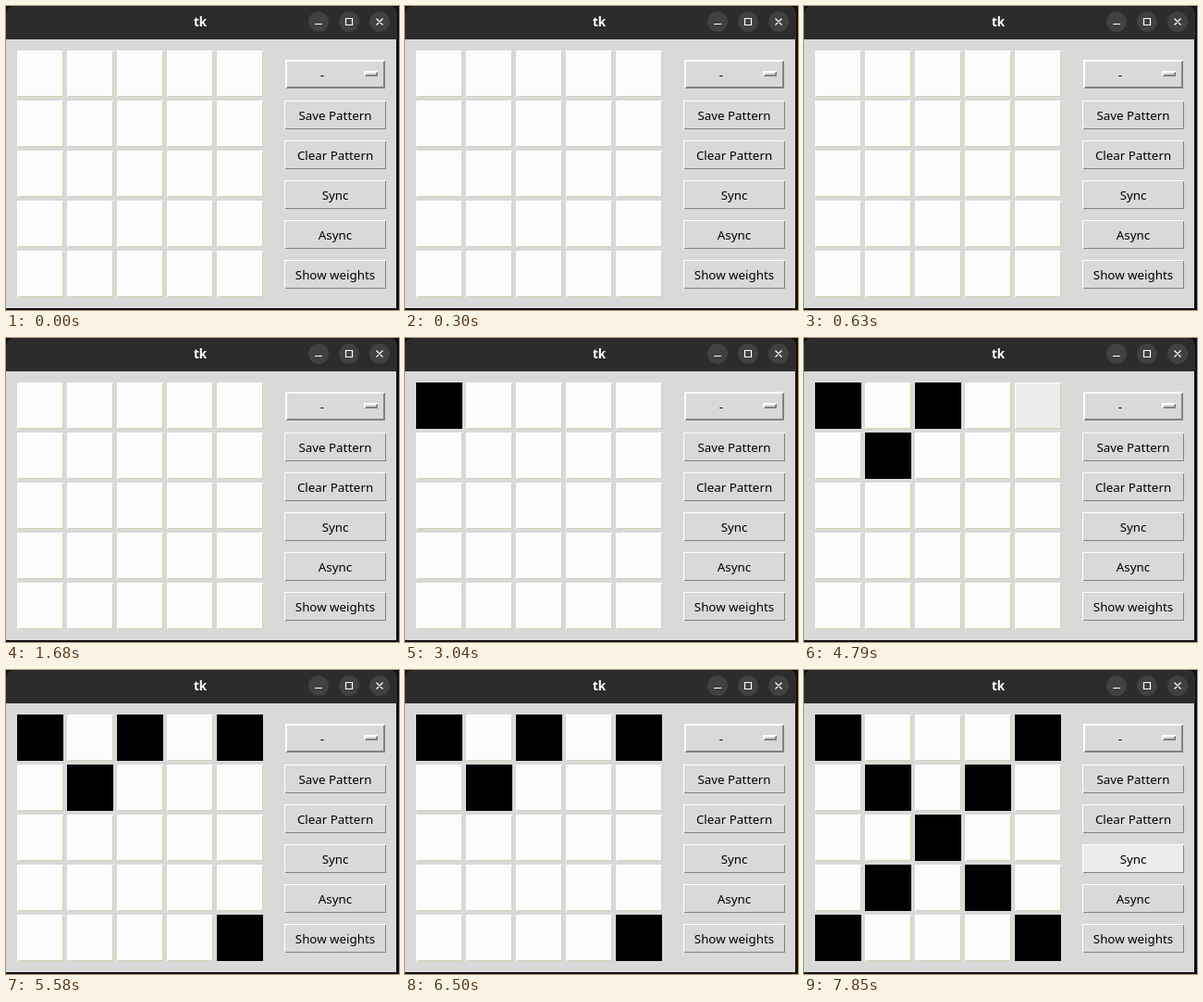
An HTML page that plays this animation: 425x328 px, repeating every 8 s.

```html
<!DOCTYPE html>
<html lang="en">
<head>
<meta charset="utf-8">
<title>tk</title>
<style>
html, body { margin: 0; width: 100%; height: 100%; overflow: hidden; background: #d9d9d9; }
svg { display: block; width: 425px; height: 328px; }
text { font: 13.33px "Noto Sans", "Open Sans", sans-serif; text-anchor: middle; fill: #000; }
.title { font-weight: 700; font-size: 13.5px; fill: #fff; }
</style>
</head>
<body>
<svg id="stage" viewBox="0 0 425 328" shape-rendering="crispEdges"></svg>
<script>
const LOOP = 8000;
const SIZE = 5;
const ACTIVE = '#ececec';
const FACE = '#d9d9d9';
const stage = document.getElementById('stage');

function add(tag, attrs, text) {
  const el = document.createElementNS('http://www.w3.org/2000/svg', tag);
  for (const key in attrs) el.setAttribute(key, attrs[key]);
  if (text) el.textContent = text;
  stage.appendChild(el);
  return el;
}

function rect(x, y, width, height, fill) {
  return add('rect', { x, y, width, height, fill });
}

// A beveled box; `set` changes its face and relief.
function bevel(x, y, w, h, b, face, light, dark) {
  const lower = rect(x, y, w, h, dark);
  const upper = add('path', {
    d: `M${x} ${y}h${w}l${-b} ${b}h${2 * b - w}v${h - 2 * b}l${-b} ${b}z`, fill: light
  });
  const inner = rect(x + b, y + b, w - 2 * b, h - 2 * b, face);
  return {
    set(fill, sunken) {
      inner.setAttribute('fill', fill);
      upper.setAttribute('fill', sunken ? dark : light);
      lower.setAttribute('fill', sunken ? light : dark);
    }
  };
}

function drawWindow() {
  rect(0, 0, 425, 328, '#101010');
  rect(0, 36, 422, 290, FACE);
  add('path', { d: 'M0 36V9Q0 0 9 0H414Q423 0 423 9V36Z', fill: '#2c2c2c', 'shape-rendering': 'auto' });
  add('text', { x: 210, y: 22, class: 'title' }, 'tk');
  for (const cx of [338, 371, 404]) {
    add('circle', { cx, cy: 17, r: 11, fill: '#414141', 'shape-rendering': 'auto' });
  }
  const icon = { fill: 'none', stroke: '#fff', 'stroke-width': 1.2, 'shape-rendering': 'auto' };
  add('path', { ...icon, d: 'M334 19.5h8M367.5 13.5h7v7h-7zM400.5 13.5l7 7m0-7l-7 7' });
}

function drawMenu() {
  bevel(302, 58, 108, 31, 2, FACE, '#fff', '#828282');
  add('text', { x: 342, y: 79 }, '-');
  bevel(387, 70, 15, 6, 2, FACE, '#fff', '#828282');
}

drawWindow();

const cells = [];
for (let i = 0; i < SIZE * SIZE; i++) {
  const x = 12 + 54 * (i % SIZE);
  const y = 48 + 54 * Math.floor(i / SIZE);
  cells.push({
    box: bevel(x, y, 50, 50, 1, '#fcfcfc', '#fff', '#d2d2b8'),
    black: rect(x, y, 50, 50, '#000')
  });
}

drawMenu();

const buttons = ['Save Pattern', 'Clear Pattern', 'Sync', 'Async', 'Show weights'].map((label, i) => {
  const y = 102 + 43 * i;
  const box = bevel(301, y, 110, 31, 1, FACE, '#fff', '#828282');
  add('text', { x: 356, y: y + 21 }, label);
  return box;
});
const sync = buttons[2];

// Pointer visits: cell index, enter time, leave time, whether it is clicked.
const visits = [
  [0, 2610, 3040, true],
  [1, 3070, 3400],
  [6, 3500, 3660, true],
  [2, 3860, 4190, true],
  [3, 4320, 4420],
  [4, 4490, 4880, true],
  [9, 4880, 4980],
  [14, 4980, 5050],
  [19, 5050, 5120],
  [24, 5120, 5580, true]
];
const HOVER = 6700, PRESS = 7690, RECALL = 7850;

// The recalled pattern is both diagonals.
function recalled(i) {
  const row = Math.floor(i / SIZE), col = i % SIZE;
  return row === col || row + col === SIZE - 1;
}

function draw(t) {
  cells.forEach((cell, i) => {
    let on = t >= RECALL && recalled(i);
    let hover = false;
    for (const [id, enter, leave, click] of visits) {
      if (id !== i) continue;
      if (t >= enter && t < leave) hover = true;
      if (click && t >= leave && t < RECALL) on = true;
    }
    cell.box.set(hover ? ACTIVE : '#fcfcfc', false);
    cell.black.setAttribute('visibility', on ? 'visible' : 'hidden');
  });
  sync.set(t >= HOVER ? ACTIVE : FACE, t >= PRESS && t < RECALL);
}

const start = performance.now();
function tick() {
  draw((performance.now() - start) % LOOP);
  requestAnimationFrame(tick);
}
tick();
</script>
</body>
</html>
```
